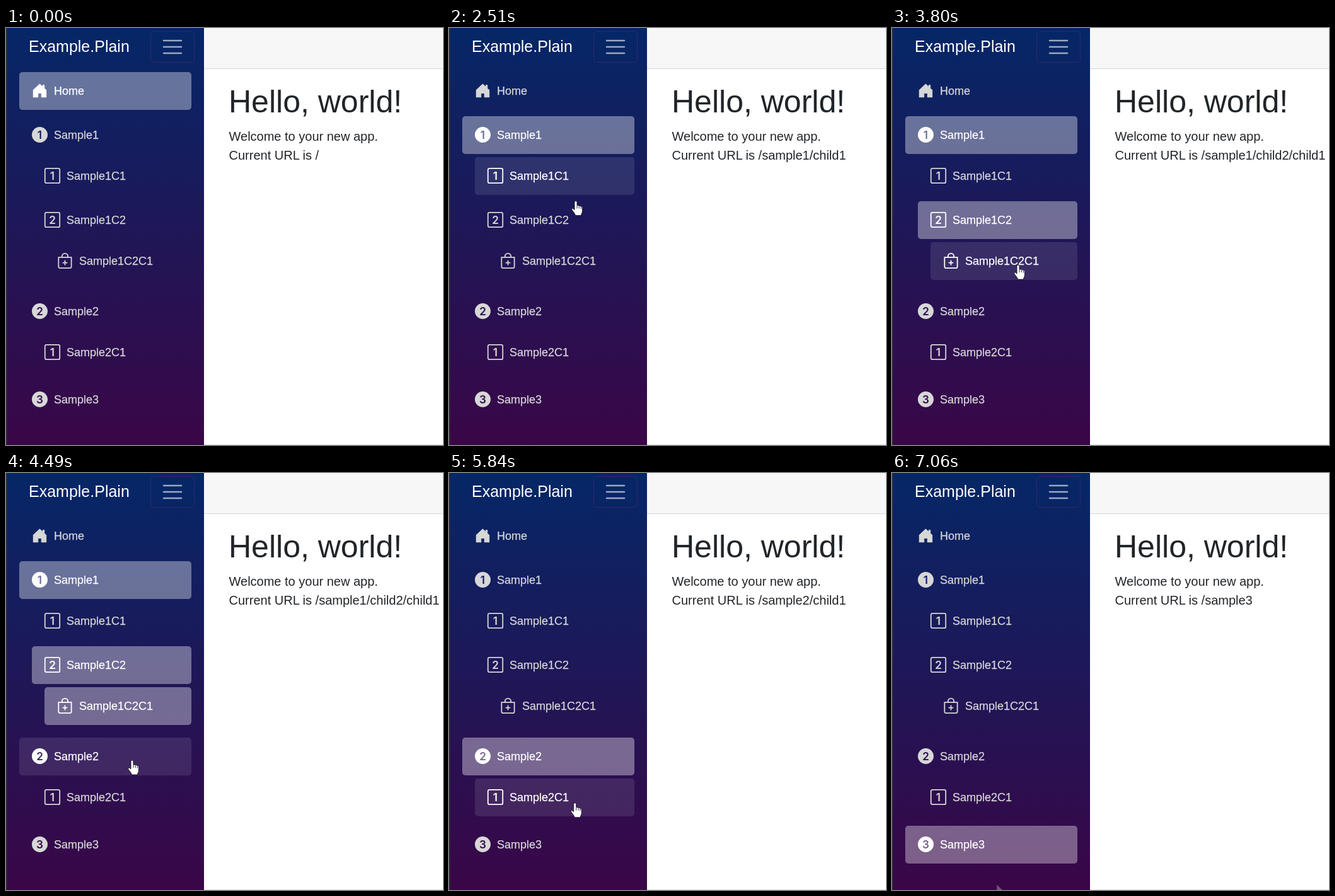
Write an HTML page that moves like this. It is 693 px wide and 662 px high and loops after 8.4 s.

```html
<!DOCTYPE html>
<html lang="en">
<head>
<meta charset="utf-8">
<title>Nested navigation menu</title>
<style>
html, body { margin: 0; width: 100%; height: 100%; overflow: hidden; background: #fff; }
svg { display: block; width: 100%; height: 100%; }
text { font-family: "Liberation Sans", Arial, sans-serif; }
.label { font-size: 18px; fill: currentColor; stroke: currentColor; stroke-width: .25; }
.digit { font: 600 11px Inter, sans-serif; text-anchor: middle; }
.solid { fill: currentColor; }
.line { fill: none; stroke: currentColor; stroke-width: 1.15; stroke-linecap: round; }
.body { font-size: 20px; fill: #212529; }
</style>
</head>
<body>
<svg viewBox="0 0 693 662">
  <defs>
    <linearGradient id="night" x2="0" y2="1">
      <stop stop-color="#052767"/><stop offset="1" stop-color="#3a0647"/>
    </linearGradient>
  </defs>
  <rect width="693" height="662" fill="#fff"/>
  <rect x="314" width="379" height="64" fill="#f7f7f7"/>
  <rect x="314" y="64" width="379" height="1" fill="#d6d5d5"/>
  <rect width="314" height="662" fill="url(#night)"/>
  <rect width="1.5" height="662" fill="#333338"/>
  <rect x="314" y="661" width="379" height="1" fill="#e4e4e4"/>
  <text x="36" y="38" font-size="25" fill="#fff">Example.Plain</text>
  <rect x="229.5" y="5.5" width="69" height="49" rx="5" fill="none" stroke="#33296c"/>
  <path d="M250 20h28M250 30h28M250 40h28" stroke="#fff" stroke-opacity=".6" stroke-width="2.5" stroke-linecap="round"/>
  <g id="menu"></g>
  <text x="353" y="134" font-size="50" fill="#212529">Hello, world!</text>
  <text class="body" x="353.5" y="179">Welcome to your new app.</text>
  <text class="body" x="353.5" y="209" id="address"></text>
  <g id="cursor">
    <g id="hand" fill="#fff" stroke="#15101f" stroke-width=".9" stroke-linejoin="round">
      <path d="M-2 14V2a2 2 0 0 1 4 0v5.5c1-.8 3-.6 3.3.6 1.2-.7 2.8-.3 3.1.9 1-.4 2.1.1 2.1 1.5V16c0 3-1.8 4-2 7H-.5c-.5-3-3.5-5.5-5.5-8.8-1-1.8.9-2.9 2.2-1.7Z"/>
      <path d="M2 8v4M5.3 8.5v3.5M8.4 9.5v3" fill="none"/>
    </g>
    <path id="arrow" d="M0 0v17l4-4 2.5 6 3-1.3-2.5-5.7h5.5Z" fill="#fff" stroke="#222" stroke-width=".8"/>
    <circle id="press" r="12" fill="#c8b414" fill-opacity=".7"/>
  </g>
</svg>
<script>
const LOOP = 8400, FADE = 150, MOVE = 300, LAG = 70;
const $ = id => document.getElementById(id);

const digit = (n, fill = 'currentColor') => `<text class="digit" x="8" y="12" fill="${fill}">${n}</text>`;
const disc = n => `<mask id="cut${n}"><circle cx="8" cy="8" r="8" fill="#fff"/>${digit(n, '#000')}</mask>
  <rect class="solid" width="16" height="16" mask="url(#cut${n})"/>`;
const box = n => `<rect class="line" x=".5" y=".5" width="15" height="15" rx="1.5"/>${digit(n)}`;
const house = `<path class="solid" stroke="currentColor" stroke-width=".7" stroke-linejoin="round"
  d="M1.5 7.4 8 1.3l3.2 3.1V2.4h1.4v3.4l1.9 1.6v7.2H9.8v-4H6.2v4H1.5Z"/>`;
const bag = `<path class="line" d="M1.5 4.5h13V14a1.5 1.5 0 0 1-1.5 1.5H3A1.5 1.5 0 0 1 1.5 14ZM5 4.5v-1a3 3 0 0 1 6 0v1M8 8v4M6 10h4"/>`;

const items = [
  { label: 'Home', url: '/', icon: house },
  { label: 'Sample1', url: '/sample1', icon: disc(1) },
  { label: 'Sample1C1', url: '/sample1/child1', icon: box(1) },
  { label: 'Sample1C2', url: '/sample1/child2', icon: box(2) },
  { label: 'Sample1C2C1', url: '/sample1/child2/child1', icon: bag },
  { label: 'Sample2', url: '/sample2', icon: disc(2) },
  { label: 'Sample2C1', url: '/sample2/child1', icon: box(1) },
  { label: 'Sample3', url: '/sample3', icon: disc(3) }
];

// Each level indents by 20; changing level tightens or loosens the 70 px rhythm.
let y = 0, lastDepth = 0;
for (const item of items) {
  const depth = item.url.split('/').length - 2;
  y += 70 - 5 * (depth - lastDepth);
  lastDepth = depth;
  Object.assign(item, { x: 21 + 20 * depth, y });
}

$('menu').innerHTML = items.map(({ label, icon, x, y }) =>
  `<g class="link"><rect x="${x}" y="${y}" width="${294 - x}" height="60" rx="5" fill="#fff"/>
    <g transform="translate(${x + 20} ${y + 17}) scale(1.5625)">${icon}</g>
    <text class="label" x="${x + 55}" y="${y + 36}">${label}</text></g>`).join('');
const links = [...document.querySelectorAll('.link')];

// The pointer sets off at `go`, rests at x, y and clicks at `press`.
const entry = { x: 620, y: 607 };
const stops = [
  { go: 530, x: 195, y: 144, press: 1350 },
  { go: 1640, x: 201, y: 238, press: 2190 },
  { go: 2350, x: 201, y: 304, press: 2980 },
  { go: 3146, x: 200, y: 376, press: 3713 },
  { go: 4050, x: 200, y: 456, press: 4820 },
  { go: 5060, x: 200, y: 522, press: 5550 },
  { go: 5810, x: 191, y: 582, press: 6370 },
  { go: 6700, x: 166, y: 653 }
];

const ease = p => p * p * (3 - 2 * p);

function tipAt(t) {
  const i = stops.findLastIndex(stop => stop.go <= t);
  if (i < 0) return entry;
  const from = stops[i - 1] ?? entry, to = stops[i];
  const p = ease(Math.min((t - to.go) / MOVE, 1));
  return { x: from.x + (to.x - from.x) * p, y: from.y + (to.y - from.y) * p };
}

const itemAt = tip => items.find(({ x, y }) => tip.x >= x && tip.x < 294 && tip.y >= y && tip.y < y + 60);
const hoveredAt = t => itemAt(tipAt(t - LAG));

function urlAt(t) {
  const stop = stops.findLast(({ press }) => press + LAG <= t);
  return stop ? itemAt(stop).url : '/';
}

function lookOf(item, t) {
  const url = urlAt(t);
  const active = url === item.url || (item !== items[0] && url.startsWith(item.url + '/'));
  const hovered = hoveredAt(t) === item;
  return { shade: hovered ? 0.1 : active ? 0.37 : 0, lit: hovered || active ? 1 : 0 };
}

// Averaging the recent past turns each hard change into a linear fade.
function fadedLook(item, t) {
  const n = 15, sum = { shade: 0, lit: 0 };
  for (let k = 0; k < n; k++) {
    const look = lookOf(item, t - k * FADE / n);
    sum.shade += look.shade / n;
    sum.lit += look.lit / n;
  }
  return sum;
}

const show = (id, on) => $(id).setAttribute('visibility', on ? 'visible' : 'hidden');

function draw(t) {
  links.forEach((link, i) => {
    const { shade, lit } = fadedLook(items[i], t);
    const grey = Math.round(215 + 40 * lit);
    link.firstChild.setAttribute('fill-opacity', shade);
    link.style.color = `rgb(${grey},${grey},${grey})`;
  });
  $('address').textContent = 'Current URL is ' + urlAt(t);

  const tip = tipAt(t), visible = t >= stops[0].go, pointing = !!hoveredAt(t);
  const gone = t >= stops.at(-1).go + MOVE;
  $('cursor').setAttribute('transform', `translate(${tip.x} ${tip.y})`);
  $('cursor').setAttribute('opacity', gone ? 0.3 : 1);
  show('hand', visible && pointing);
  show('arrow', visible && !pointing);
  show('press', stops.some(({ press }) => t >= press && t < press + LAG));
}

const began = performance.now();
function tick() {
  draw((performance.now() - began) % LOOP);
  requestAnimationFrame(tick);
}
tick();
</script>
</body>
</html>
```
